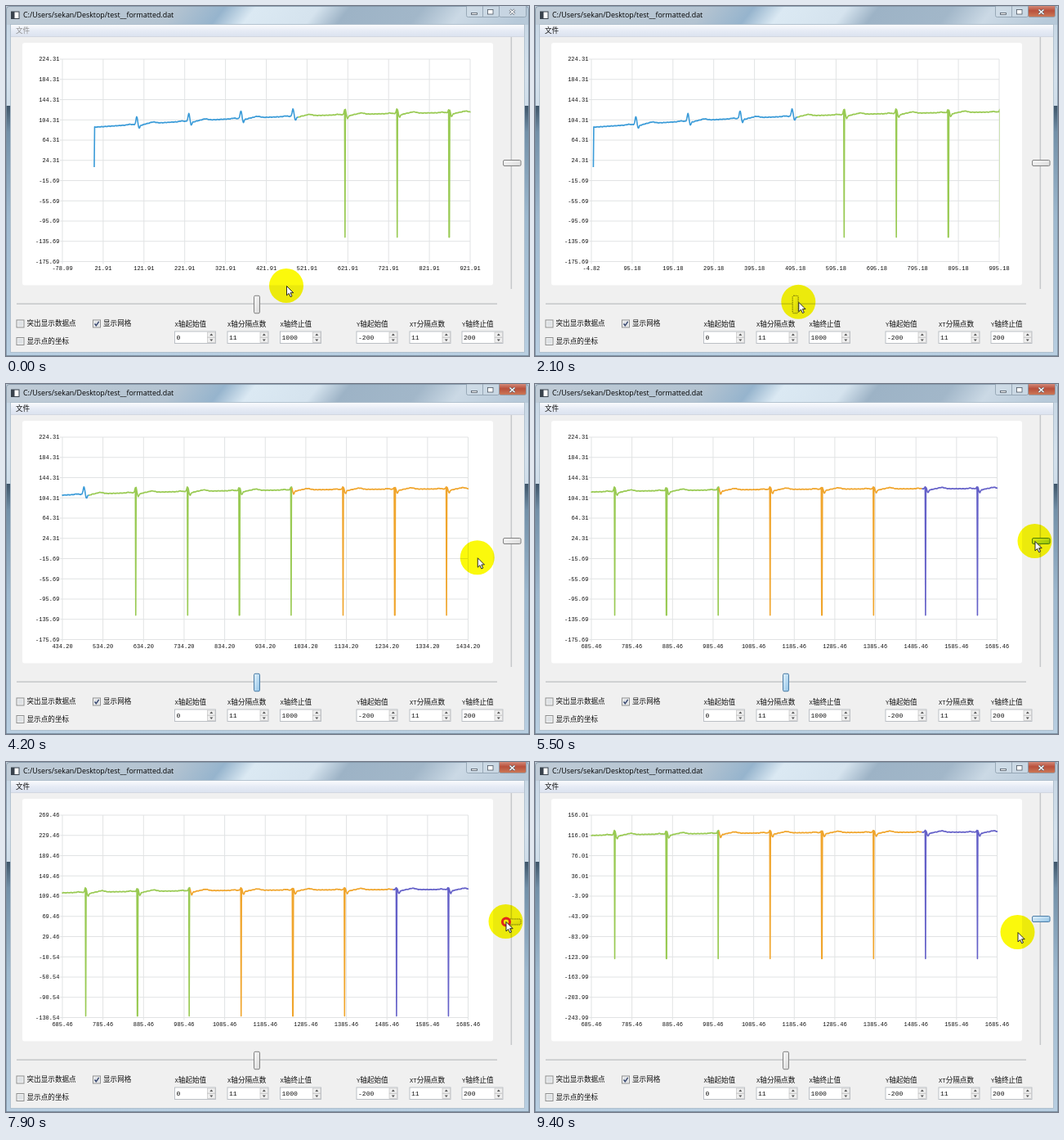
Recreate the animation shown at these times as an HTML page. Size 640 by 428 pixels, loop 9500 ms.

```html
<!DOCTYPE html>
<html lang="zh">
<head>
<meta charset="utf-8">
<style>
html, body { margin: 0; width: 640px; height: 428px; overflow: hidden; background: #f0f0f0; }
svg { display: block; }
text { white-space: pre; }
.cjk { font: 8.6px "Noto Sans CJK SC", "Noto Sans CJK", sans-serif; fill: #111; }
.half { font: 7.2px "Liberation Mono", monospace; }
.title { font: 8.9px "Open Sans", sans-serif; fill: #000; }
.num { font: 7px "Liberation Mono", monospace; fill: #111; }
.spin { font: 8.1px "Liberation Mono", monospace; fill: #111; }
.line { fill: none; stroke-width: 1.6; stroke-linejoin: round; vector-effect: non-scaling-stroke; }
#spot { mix-blend-mode: multiply; }
</style>
</head>
<body>
<svg id="stage" width="640" height="428" viewBox="0 0 640 428">
  <defs>
    <linearGradient id="bar" gradientUnits="userSpaceOnUse" x1="0" y1="0" x2="640" y2="0" gradientTransform="skewX(-38)">
      <stop offset="0" stop-color="#c0ccd7"/><stop offset=".33" stop-color="#b3c3d1"/><stop offset=".42" stop-color="#96b4cd"/>
      <stop offset=".48" stop-color="#dbe9f3"/><stop offset=".6" stop-color="#d5e3ee"/><stop offset=".66" stop-color="#9db3c6"/>
      <stop offset=".8" stop-color="#a2b7c9"/><stop offset=".88" stop-color="#cbd9e5"/><stop offset="1" stop-color="#b7c9d9"/>
    </linearGradient>
    <linearGradient id="side" x2="0" y2="1"><stop offset="0" stop-color="#c4d4e3"/><stop offset=".2" stop-color="#d5e2ed"/><stop offset=".284" stop-color="#d0deea"/><stop offset=".286" stop-color="#3f566a"/><stop offset=".36" stop-color="#7390a8"/><stop offset=".6" stop-color="#9db8ce"/><stop offset="1" stop-color="#b9cfe2"/></linearGradient>
    <linearGradient id="menu" x2="0" y2="1"><stop offset="0" stop-color="#fafbfd"/><stop offset=".5" stop-color="#e6ebf5"/><stop offset="1" stop-color="#dbe2ef"/></linearGradient>
    <linearGradient id="close" x2="0" y2="1"><stop offset="0" stop-color="#dc9c8c"/><stop offset=".5" stop-color="#b9503c"/><stop offset="1" stop-color="#cc7a58"/></linearGradient>
    <linearGradient id="grey" x2="1" y2="1"><stop offset="0" stop-color="#fafafa"/><stop offset="1" stop-color="#d8d8d8"/></linearGradient>
    <linearGradient id="blue" x2="1" y2="1"><stop offset="0" stop-color="#e4f3fc"/><stop offset="1" stop-color="#8fc2e6"/></linearGradient>
    <clipPath id="plot"><rect id="clip" x="68.5" y="64" height="249.5"/></clipPath>
  </defs>
  <g id="frame"></g>
  <g id="grid"></g>
  <g clip-path="url(#plot)"><g id="curves"></g></g>
  <g id="panel"></g>
  <g id="hs"></g>
  <g id="vs"></g>
  <circle id="spot" r="21" fill="#fbf90c"/>
  <g id="pointer">
    <circle id="ring" r="4.6" fill="none" stroke="#e3261c" stroke-width="3"/>
    <path d="M0 0V11.4L2.7 8.9L4.6 13.2L6.5 12.3L4.6 8.2H8.2Z" fill="#fff" stroke="#111" stroke-width=".9"/>
  </g>
</svg>
<script>
const $ = id => document.getElementById(id);
const LOOP = 9500, LEFT = 69, TOP = 65, HEIGHT = 247.5;

const rect = (x, y, w, h, fill, more = '') =>
  `<rect x="${x}" y="${y}" width="${w}" height="${h}" fill="${fill}" ${more}/>`;
const path = (d, stroke, width = 1, more = '') =>
  `<path d="${d}" fill="none" stroke="${stroke}" stroke-width="${width}" ${more}/>`;
const label = (x, y, s, cls, more = '') => `<text x="${x}" y="${y}" class="${cls}" ${more}>${s}</text>`;

// Keys are [time, value, ...]
function track(keys, t, i = 1, ease = u => u) {
  if (t <= keys[0][0]) return keys[0][i];
  for (let k = 1; k < keys.length; k++) {
    const a = keys[k - 1], b = keys[k];
    if (t <= b[0]) return a[i] + (b[i] - a[i]) * ease((t - a[0]) / (b[0] - a[0]));
  }
  return keys[keys.length - 1][i];
}
const smooth = u => u * u * (3 - 2 * u);

const xShift = [[1100, -78.09], [1300, -70.9], [2000, -18], [2900, 100.62], [4200, 434.2], [5200, 685.46]];
const yShift = [[6000, 0], [6300, 5], [7000, 38], [7300, 46], [7700, 46], [7900, 45.15], [8300, 22], [8900, -56], [9200, -68.3]];
const hPos = [[1100, 307], [1300, 313], [2000, 318], [2900, 324], [3400, 324], [3401, 307]];
const vPos = [[6000, 192], [6500, 186], [7100, 184], [7300, 184], [7301, 192], [7700, 192], [7900, 195.5], [8400, 203], [9000, 203], [9001, 192]];
const mouse = [
  [0, 343, 342], [900, 312, 365], [1100, 311, 365], [1300, 316, 365.5], [2000, 322, 362],
  [2900, 330.5, 358], [3400, 331, 358], [4100, 576.5, 212.5], [4300, 577, 212], [5200, 611.5, 192],
  [6000, 611.5, 192], [6500, 611.5, 186], [7300, 611.5, 184], [7600, 611.5, 192], [7900, 611.5, 195],
  [8400, 611.5, 203], [9000, 611.5, 203], [9400, 590.5, 208]
];
const within = (t, ...spans) => spans.some(([a, b]) => t >= a && t < b);

// Heartbeat-like signal on a slowly saturating baseline
const bump = (p, at, width, amp) => amp * Math.exp(-(((p - at) / width) ** 2));
function signal(x) {
  if (x === 0) return 11;
  const beat = Math.round((x - 104.3) / 127.7), p = x - 104.3 - beat * 127.7;
  const base = 123 - 33 * Math.exp(-((x / 470) ** 1.15));
  const noise = 0.35 * Math.sin(x * 1.9) + 0.3 * Math.sin(x * 0.73 + 1);
  if (beat < 0) return base + noise;
  if (beat > 3 && Math.abs(p) < 0.6) return -127.5;
  return base + noise + bump(p, 0, 2.8, Math.min(15, 126.5 - base)) + bump(p, 6, 2.6, -7)
    + bump(p, 12, 7, -2) + bump(p, 40, 10, 2.6) + bump(p, -18, 6, 1.2);
}

function buildCurves() {
  $('curves').innerHTML = ['#3a9bd8', '#99ca53', '#f0a52c', '#6460c8'].map((color, n) => {
    let d = '';
    for (let x = n * 500; x <= n * 500 + 500; x++) d += (d ? 'L' : 'M') + x + ' ' + signal(x).toFixed(2);
    return `<path class="line" d="${d}" stroke="${color}"/>`;
  }).join('');
}

function buildFrame() {
  $('frame').innerHTML =
    rect(0, 0, 640, 428, 'url(#side)') +
    rect(0, 0, 640, 23, 'url(#bar)') +
    path('M.5 428V4Q.5 .5 4 .5H636Q639.5 .5 639.5 4V428', '#7d91a3', .8) +
    path('M0 427.5H640', '#6f8394', .8) +
    rect(5.5, 22.5, 629, 401, '#f0f0f0', 'stroke="#a9bac9" stroke-width=".8"') +
    rect(6.5, 7, 9.5, 8.5, '#fff', 'stroke="#39424c"') +
    rect(6.5, 7, 4, 8.5, '#39424c') +
    label(21, 14.2, 'C:/Users/sekan/Desktop/test__formatted.dat', 'title') +
    rect(563.5, -2, 40, 15.5, '#d3dfea', 'rx="2" fill-opacity=".5" stroke="#8b9cab" stroke-width=".8"') +
    rect(603.5, -2, 33, 15.5, '#c7d5e2', 'id="shut" rx="2" stroke="#8b9cab" stroke-width=".8"') +
    path('M583.5 0V13', '#8b9cab', .8) +
    rect(569.5, 8.5, 7, 2, '#fff', 'stroke="#4c5663" stroke-width=".8"') +
    rect(589.5, 4.5, 6.5, 5.5, '#fff', 'stroke="#4c5663" stroke-width=".8"') +
    path('M616.5 4.5L622.5 10M622.5 4.5L616.5 10', '#4c5663', 2.6) +
    path('M616.5 4.5L622.5 10M622.5 4.5L616.5 10', '#fff', 1.5) +
    rect(6, 23, 628, 14.5, 'url(#menu)') +
    path('M6 37.5H634', '#cdd3de', .8) +
    label(12, 33.4, '文件', 'cjk', 'id="file"') +
    rect(20, 45, 576, 296.5, '#fff', 'rx="3"');
}

function check(x, y, on, s) {
  return rect(x + .5, y + .5, 9, 9, '#f4f4f4', 'stroke="#8e8f8f"') +
    rect(x + 2, y + 2, 6, 6, '#dfe2e5') +
    (on ? path(`M${x + 2.5} ${y + 5}L${x + 4.3} ${y + 7.3}L${x + 7.7} ${y + 2.3}`, '#36456e', 1.4) : '') +
    label(x + 13, y + 7.9, s, 'cjk');
}

function spin(x, latin, s, value) {
  const arrow = (y, dir) =>
    rect(x + 40.5, y, 9.5, 6, '#efefef', 'stroke="#c3c3c3" stroke-width=".7"') +
    `<path d="M${x + 43.3} ${y + 3 + dir}h4l-2 ${-2.4 * dir}z" fill="#555"/>`;
  return label(x + .5, 391.6, `<tspan class="half">${latin}</tspan>${s}`, 'cjk') +
    rect(x + .5, 398, 50, 14.5, '#fff', 'stroke="#b5bac0" stroke-width=".9"') +
    label(x + 2.5, 408.3, value, 'spin') + arrow(399, 1) + arrow(405.6, -1);
}

function buildPanel() {
  $('panel').innerHTML =
    check(12.5, 383.5, false, '突出显示数据点') +
    check(106, 383.5, true, '显示网格') +
    check(12.5, 405, false, '显示点的坐标') +
    spin(206, 'X', '轴起始值', '0') +
    spin(270.5, 'X', '轴分隔点数', '11') +
    spin(335, 'X', '轴终止值', '1000') +
    spin(428.5, 'Y', '轴起始值', '-200') +
    spin(493.5, 'XT', '分隔点数', '11') +
    spin(557.5, 'Y', '轴终止值', '200') +
    rect(13, 363.5, 588, 1.5, '#c6c8ca') +
    rect(617.6, 38, 1.5, 308, '#c6c8ca');
}

function handle(cx, cy, w, h, hot, held) {
  const x = cx - w / 2, y = cy - h / 2;
  const fill = hot && !held ? 'url(#blue)' : 'url(#grey)';
  const edge = held ? '#555" stroke-dasharray="1.2 1' : hot ? '#4a7ca6' : '#808080';
  return rect(x, y, w, h, fill, `rx="1.5" stroke="${edge}"`);
}

function drawChart(x0, y0) {
  const wide = (x0 + 1000).toFixed(2).length > 6;
  const width = wide ? 496.5 : 499, sx = width / 1000, sy = HEIGHT / 400;
  let lines = '', texts = '';
  for (let i = 0; i <= 10; i++) {
    const x = LEFT + width * i / 10, y = TOP + HEIGHT * i / 10;
    lines += `M${x} ${TOP}V${TOP + HEIGHT + 3}M${LEFT - 3} ${y}H${LEFT + width}`;
    texts += label(x, 323.4, (x0 + i * 100).toFixed(2), 'num', 'text-anchor="middle"') +
      label(65.4, y + 2.3, (y0 + 400 - i * 40).toFixed(2), 'num', 'text-anchor="end"');
  }
  $('grid').innerHTML = path(lines, '#e1e3e4') + texts;
  $('clip').setAttribute('width', width + 1);
  $('curves').setAttribute('transform',
    `matrix(${sx} 0 0 ${-sy} ${LEFT - x0 * sx} ${TOP + HEIGHT + y0 * sy})`);
}

function draw(t) {
  drawChart(track(xShift, t), -175.69 + track(yShift, t));

  const hHeld = within(t, [1100, 3400]), vHeld = within(t, [6000, 7300], [7700, 9000]);
  $('hs').innerHTML = handle(track(hPos, t), 365, 7, 21.5, within(t, [900, 6000]), hHeld);
  $('vs').innerHTML = handle(619.3, track(vPos, t), 21.5, 7, t >= 5200, vHeld);

  const x = track(mouse, t, 1, smooth), y = track(mouse, t, 2, smooth);
  $('spot').setAttribute('cx', x);
  $('spot').setAttribute('cy', y);
  $('pointer').setAttribute('transform', `translate(${x + .5} ${y + .5})`);
  $('ring').setAttribute('visibility', within(t, [1100, 1700], [6000, 6500], [7700, 8200]) ? 'visible' : 'hidden');

  const active = t >= 1100;
  $('shut').setAttribute('fill', active ? 'url(#close)' : '#c7d5e2');
  $('file').style.fill = active ? '#111' : '#8d8d8d';
}

buildFrame();
buildPanel();
buildCurves();

const start = performance.now();
let last = -1;
function tick() {
  const t = Math.floor(((performance.now() - start) % LOOP) / 100) * 100;
  if (t !== last) draw(last = t);
  requestAnimationFrame(tick);
}
tick();
</script>
</body>
</html>
```
